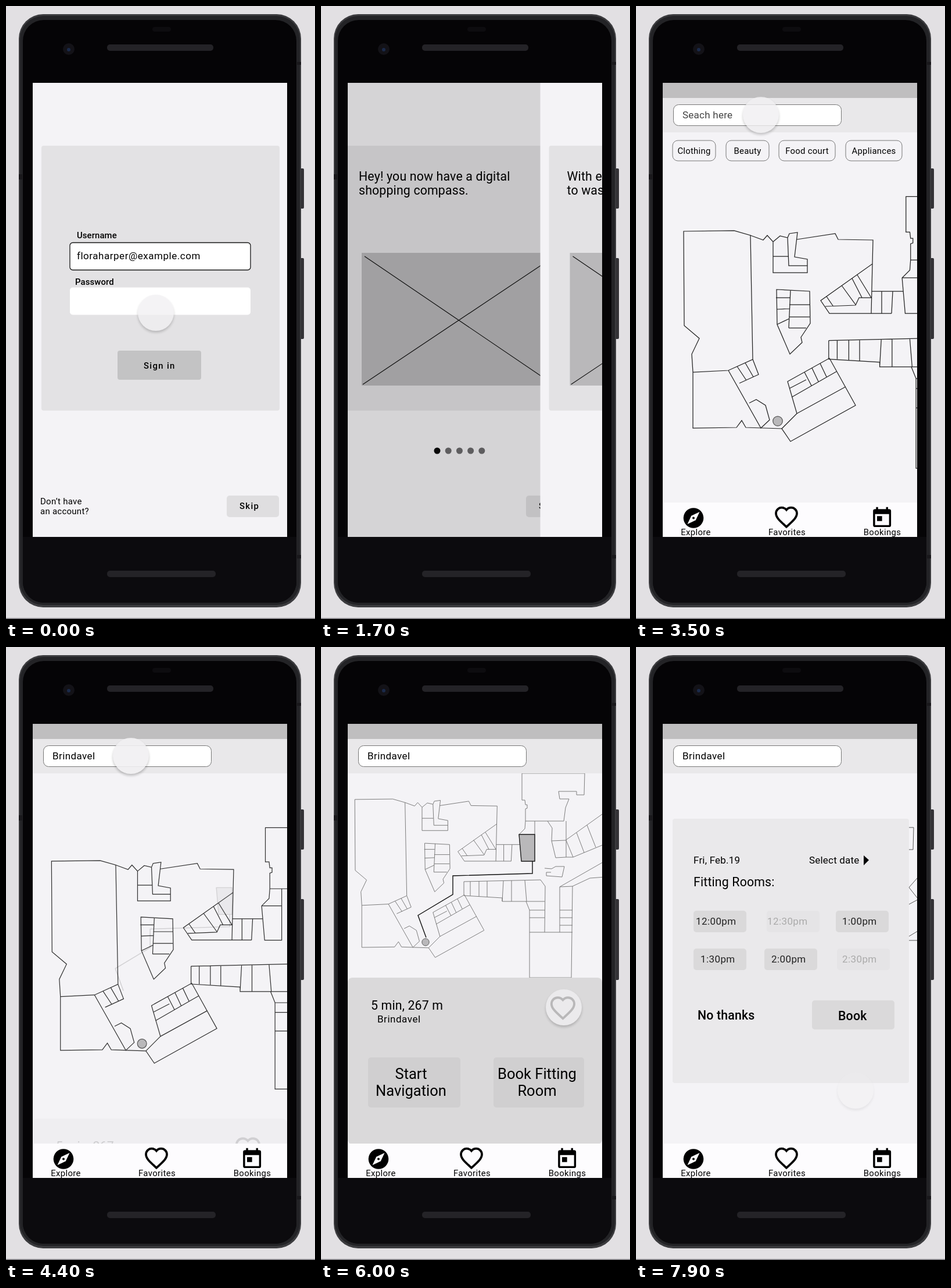
Write an HTML page that moves like this. It is 532 px wide and 1053 px high and loops after 8 s.

```html
<!DOCTYPE html>
<html lang="en">
<head>
<meta charset="utf-8">
<title>Shopping compass prototype</title>
<style>
  html, body { margin: 0; width: 100%; height: 100%; overflow: hidden; background: #e2e0e3; }
  svg { display: block; width: 532px; height: 1053px; font-family: Roboto, sans-serif; }
  .plan path { fill: none; vector-effect: non-scaling-stroke; }
  #cursor circle { filter: drop-shadow(0 3px 2px rgba(0, 0, 0, .25)); }
</style>
</head>
<body>
<svg id="stage" viewBox="0 0 532 1053"></svg>
<script>
const PAPER = '#f4f3f6', CARD = '#e3e2e4', STORE = 'Brindavel';
const HEART = 'M12 21.35l-1.45-1.32C5.4 15.36 2 12.28 2 8.5 2 5.42 4.42 3 7.5 3c1.74 0 3.41.81 4.5 2.09C13.09 3.81 14.76 3 16.5 3 19.58 3 22 5.42 22 8.5c0 3.78-3.4 6.86-8.55 11.54z';

const rect = (x, y, w, h, fill, r = 0, extra = '') =>
  `<rect x="${x}" y="${y}" width="${w}" height="${h}" rx="${r}" fill="${fill}" ${extra}/>`;
const text = (x, y, label, size = 17, spacing = .5, extra = '') =>
  `<text x="${x}" y="${y}" font-size="${size}" letter-spacing="${spacing}" ${extra}>${label}</text>`;
const group = (id, content, extra = '') => `<g id="${id}" ${extra}>${content}</g>`;
const path = (d, extra = '') => `<path d="${d}" ${extra}/>`;
const medium = 'font-weight="500"';
const middle = 'text-anchor="middle"';

// ---- phone ----
const phone = `
  ${rect(0, 0, 532, 1053, '#e2e0e3')}${rect(0, 1051.5, 532, 2, '#77757a')}
  ${rect(503, 279, 10, 69, '#343337', 2)}${rect(503, 433, 10, 139, '#343337', 2)}
  ${rect(22, 14, 486, 1019, '#3b3b3e', 42)}
  ${rect(24, 17, 482, 1012, '#232326', 40)}
  ${rect(29, 24, 471, 1001, '#050406', 36)}
  ${path('M29 912H500V989a36 36 0 0 1-36 36H65a36 36 0 0 1-36-36Z', 'fill="#0c0b0e"')}
  ${rect(22, 289, 6, 9, '#19181b')}${rect(501, 96, 7, 5, '#19181b')}${rect(501, 943, 7, 6, '#19181b')}
  ${rect(174, 66, 183, 11, '#242327', 5)}${rect(174, 970, 187, 11, '#242327', 5)}
  ${rect(252, 36, 32, 8, '#0d0c0f', 4)}
  <circle cx="108" cy="74" r="10" fill="#131217"/><circle cx="108" cy="75" r="3" fill="#1b2a4a"/>`;

// ---- sign in and introduction ----
const skip = rect(380, 841, 90, 37, '#dfdee0', 5) + text(402, 864, 'Skip', 14.9, 1.33, medium);
const backdrop = rect(40, 132, 450, 780, PAPER) + rect(61, 240, 410, 455, CARD, 4);
const field = (y, id) => rect(110, y, 311, 47, '#fff', 5, `id="${id}" stroke="#161616" stroke-width="1.3"`);

const login = backdrop +
  text(122, 399, 'Username', 14.9, .1, medium) + field(406.5, 'userField') +
  text(122, 435, 'floraharper@example.com', 17, .53) +
  text(119, 479, 'Password', 14.9, .1, medium) + field(483.5, 'passField') +
  text(122, 514, '••••••••••', 17, 2, 'id="secret"') +
  rect(192, 592, 144, 50, '#c3c3c4', 4) + text(237, 623, 'Sign in', 14.9, 1.33, medium) +
  text(59, 856, 'Don’t have', 15, .25) + text(59, 873, 'an account?', 15, .25) + skip;

function intro(lines, active) {
  const dots = [0, 1, 2, 3, 4].map(i =>
    `<circle cx="${227 + i * 19.2}" cy="764" r="5.5" fill="${i === active ? '#0a0a0a' : '#6c6b6d'}"/>`).join('');
  return rect(46, 132, 438, 780, PAPER) + rect(61, 240, 410, 455, CARD, 4) +
    lines.map((line, i) => text(92, 300 + i * 24, line, 21.3, .16)).join('') +
    rect(97, 424, 339, 228, '#b9b8ba') +
    path('M102 430L430 652M99 650L432 428', 'stroke="#111" stroke-width="1.2"') + dots + skip;
}

// ---- floor plan ----
const westWing = [
  'M82 387L169 386 197 394 201 607 159 626 98 629 96 598 109 571 83 549ZM98 629V725L173 724 182 712 189 724 251 726',
  'M197 394L219 402 226 394 236 405V458H295V435L273 431 278 389 264 391 261 398 248 395 236 405M236 430H262M261 398L263 446 295 446',
  'M277 401L343 391 348 401 408 402 407 443 318 506 333 528H440M407 443L405 528M326 516L378 514 384 501H406M328 499L339 515M354 480L378 513M372 468L389 501M381 462L405 501',
  'M406 490H460M423 490V528M442 490L440 528',
  'M242 487L299 490 300 545 284 569 286 578 265 598 243 547ZM266 488L263 553M241 501H265M242 521L264 520M264 513H299M264 534H299M263 553H293M243 547L264 537',
  'M201 607L211 633 178 648M174 619L190 643M188 613L202 637M159 626L215 725 230 711 223 686 207 676 195 682',
  'M251 726L277 700 261 645 333 605 378 686 266 748ZM277 700L361 654M268 672L345 628M264 657L293 642M290 629L302 652M303 622L314 645M317 614L328 637',
];
const eastWing = [
  'M346 217H454L453 254H440V248H409L411 261H427L421 276 418 299H352V278L355 277V271H352L351 263H346ZM352 299L351 312 341 322 345 368H368V322H341M368 299V322',
  'M390 299L398 311 397 333 404 362 422 361V299M397 333L421 332M422 361L434 361 490 338M421 332L490 283M422 332L434 361M440 319L453 353M458 306L473 344',
  'M246 403L378 400 386 411 385 490M246 403V427L312 431V437H352L385 437M257 403V427M272 402V428M286 402V429M314 402L312 437M328 401V437M351 401L354 437',
  'M353 437L359 452V568H431L433 411 411 412V490M359 452H385M359 465H385M359 490H433M411 452H433M411 465H433M411 478H433M411 412L490 367M433 411L463 397 490 395',
  'M385 380L397 381 404 377H419L415 395 388 393V387H396',
];
const map = group('plan',
  westWing.map(d => path(d)).join('') +
  `<g transform="translate(4.6 38.7) scale(1.33)">${eastWing.map(d => path(d)).join('')}
   <circle cx="180" cy="507" r="6.2" fill="#b9b8ba" stroke="#555" vector-effect="non-scaling-stroke"/></g>`,
  'class="plan"');
const route = group('route',
  path('M341 322H368V368H345Z', 'fill="#b9b8ba" stroke="#222" stroke-width="1.4"') +
  path('M181 499L167 461 227 425V393L364 389V368', 'fill="none" stroke="#111" stroke-width="1.4"'));

// ---- map screen ----
const chips = [[63, 74, 'Clothing'], [155, 74, 'Beauty'], [246, 97, 'Food court'], [361, 97, 'Appliances']]
  .map(([x, w, label]) => rect(x, 231, w, 35, PAPER, 9, 'stroke="#777"') +
    text(x + w / 2, 254, label, 14.9, .26, middle)).join('');
const header = rect(46, 132, 438, 26, '#bfbebf') + rect(46, 158, 438, 59, '#e9e8ea') +
  rect(64.5, 169.5, 289, 36, '#fff', 9, 'stroke="#777"') +
  text(80, 193, 'Seach here', 17, .25, 'id="hint" fill="#444"') + text(80, 193, STORE, 17, .4, 'id="query"');

const nav = rect(46, 853, 438, 59, '#fdfcfe') +
  '<circle cx="99" cy="879.5" r="17.3"/>' + path('M88.500 890L95.200 875.700 109.500 869 102.800 883.300Z', 'fill="#fff"') +
  '<circle cx="99" cy="879.500" r="2"/>' +
  path(HEART, 'transform="translate(237.400 856.300) scale(1.8)" fill="none" stroke="#000" stroke-width="2.100"') +
  path('M16 1v2H8V1H6v2H5Q3 3 3 5V19Q3 21 5 21H19Q21 21 21 19V5Q21 3 19 3H18V1ZM19 19H5V8H19ZM7 10H12V15H7Z',
    'transform="translate(403 859) scale(1.72)" fill-rule="evenodd"') +
  [[103, 'Explore'], [260, 'Favorites'], [424, 'Bookings']]
    .map(([x, label]) => text(x, 909, label, 14.9, .37, middle)).join('');

const panel = rect(46, 568, 438, 286, '#dad9da', 8) +
  text(86, 623, '5 min, 267 m', 21.3, .16) + text(97, 645, STORE, 17, .53) +
  rect(81, 705, 159, 86, '#d0cfd0', 5) + rect(297, 705, 156, 86, '#d0cfd0', 5) +
  [[155, 'Start', 'Navigation'], [372, 'Book Fitting', 'Room']].map(([x, a, b]) =>
    text(x, 742, a, 25.5, 0, middle) + text(x, 771, b, 25.5, 0, middle)).join('') +
  path(HEART, 'id="outline" transform="translate(392.900 596.300) scale(1.960)" fill="none" stroke="#111" stroke-width="2"') +
  path(HEART, 'id="filled" transform="translate(390.700 593.800) scale(2.150)"');

const slots = [[99, 453, 103, '12:00pm', 1], [225, 453, 226, '12:30pm', 0], [344, 453, 355, '1:00pm', 1],
  [99, 518, 111, '1:30pm', 1], [221, 518, 233, '2:00pm', 1], [346, 518, 355, '2:30pm', 0]]
  .map(([x, y, tx, label, free]) => rect(x, y, 91, 37, free ? '#dad9da' : '#e5e4e6', 5) +
    text(tx, y + 24, label, 17, .4, `fill="${free ? '#222' : '#aaa'}"`)).join('');
const booking = rect(46, 217, 438, 637, PAPER) +
  path('M470 310H478L477 348H470M485 396L470 413 485 432M470 442L485 434M470 497L485 488M470 504H485',
    'fill="none" stroke="#555"') +
  rect(63, 295, 407, 454, '#eae9eb', 4) +
  text(99, 372, 'Fri, Feb.19', 17, .2) + text(298, 372, 'Select date', 17, .2) + path('M392 358L401 366 392 375Z') +
  text(99, 411, 'Fitting Rooms:', 21.3, .16) + slots +
  rect(303, 607, 142, 50, '#dad9da', 5) +
  text(106, 640, 'No thanks', 21.3, .16, medium) + text(348, 641, 'Book', 21.3, .16, medium);

document.getElementById('stage').innerHTML = `
  <clipPath id="screen">${rect(46, 132, 438, 780, '#000')}</clipPath>
  ${phone}
  <g clip-path="url(#screen)">
    ${group('login', login)}
    ${group('welcome', intro(['Hey! you now have a digital', 'shopping compass.'], 0))}
    ${rect(46, 132, 438, 780, '#000', 0, 'id="scrim"')}
    ${group('second', intro(['With easy navigation, say goodbye', 'to wasted time!'], 1))}
    ${group('mapScreen', rect(46, 132, 438, 780, PAPER) + map + route + group('chips', chips) +
      group('panel', panel) + group('booking', booking) + header + nav)}
    ${group('cursor', '<circle r="31" fill="#f1f0f2"/>')}
  </g>`;

// ---- motion ----
const el = id => document.getElementById(id);
const set = (id, name, value) => el(id).setAttribute(name, value);
const fade = (id, alpha) => set(id, 'opacity', alpha);
const mix = (a, b, p) => a + (b - a) * p;
const clamp = v => Math.min(1, Math.max(0, v));
const easeOut = (t, start, length = 300) => 1 - (1 - clamp((t - start) / length)) ** 2;

// time, x, y, opacity
const cursorKeys = [
  [0, 258, 527, .75], [200, 258, 527, .8], [500, 264, 618, .8], [850, 264, 618, .8], [1000, 264, 618, 0],
  [1300, 380, 600, 0], [1400, 380, 600, .7], [1620, 200, 600, .7], [1680, 190, 600, 0],
  [2150, 425, 800, 0], [2400, 432, 870, .8], [2700, 434, 874, .8], [2800, 434, 874, .6], [2950, 434, 874, 0],
  [3100, 260, 260, 0], [3400, 215, 187, .8], [4400, 215, 187, .9], [4650, 215, 187, 0],
  [5500, 400, 690, 0], [5800, 418, 619, .75], [6400, 418, 619, .75], [6900, 381, 737, .8],
  [7100, 381, 738, .8], [7500, 378, 762, .8], [7900, 378, 762, .25], [8000, 378, 762, 0]];

function placeCursor(t) {
  const next = cursorKeys.findIndex(key => key[0] > t);
  const a = cursorKeys[next - 1], b = cursorKeys[next];
  const p = (t - a[0]) / (b[0] - a[0]), smooth = p * p * (3 - 2 * p);
  const [, x, y, alpha] = a.map((v, i) => mix(v, b[i], smooth));
  set('cursor', 'transform', `translate(${x} ${y})`);
  fade('cursor', alpha);
}

function draw(t) {
  const focused = t >= 250;
  set('userField', 'stroke-opacity', focused ? 0 : 1);
  set('passField', 'stroke-opacity', focused ? 1 : 0);
  fade('secret', focused ? 1 : 0);
  fade('welcome', easeOut(t, 850));

  const push = easeOut(t, 1662);
  set('welcome', 'transform', `translate(${-111 * push} 0)`);
  fade('scrim', .54 * push);
  set('second', 'transform', `translate(${438 * (1 - push)} 0)`);
  fade('mapScreen', easeOut(t, 2697));

  const searched = easeOut(t, 3550);
  fade('chips', 1 - searched);
  fade('hint', 1 - searched);
  fade('query', searched);

  const found = easeOut(t, 4377), scale = mix(1, 1 / 1.33, found);
  const shade = mix(34, 112, found);
  set('plan', 'transform',
    `translate(${mix(244, 180, found)} ${mix(713, 507, found)}) scale(${scale}) translate(-244 -713)`);
  set('plan', 'stroke', `rgb(${shade},${shade},${shade})`);
  set('plan', 'stroke-width', mix(1.25, .9, found));
  set('route', 'transform', `translate(${25 * (1 - found)} ${108 * (1 - found)})`);
  fade('route', found);
  set('panel', 'transform', `translate(0 ${286 * (1 - found)})`);
  fade('panel', found);

  const liked = easeOut(t, 6250, 200);
  fade('filled', liked);
  fade('outline', 1 - liked);
  fade('booking', easeOut(t, 7500));
  placeCursor(t);
}

function tick() {
  draw(performance.now() % 8000);
  requestAnimationFrame(tick);
}
tick();
</script>
</body>
</html>
```
